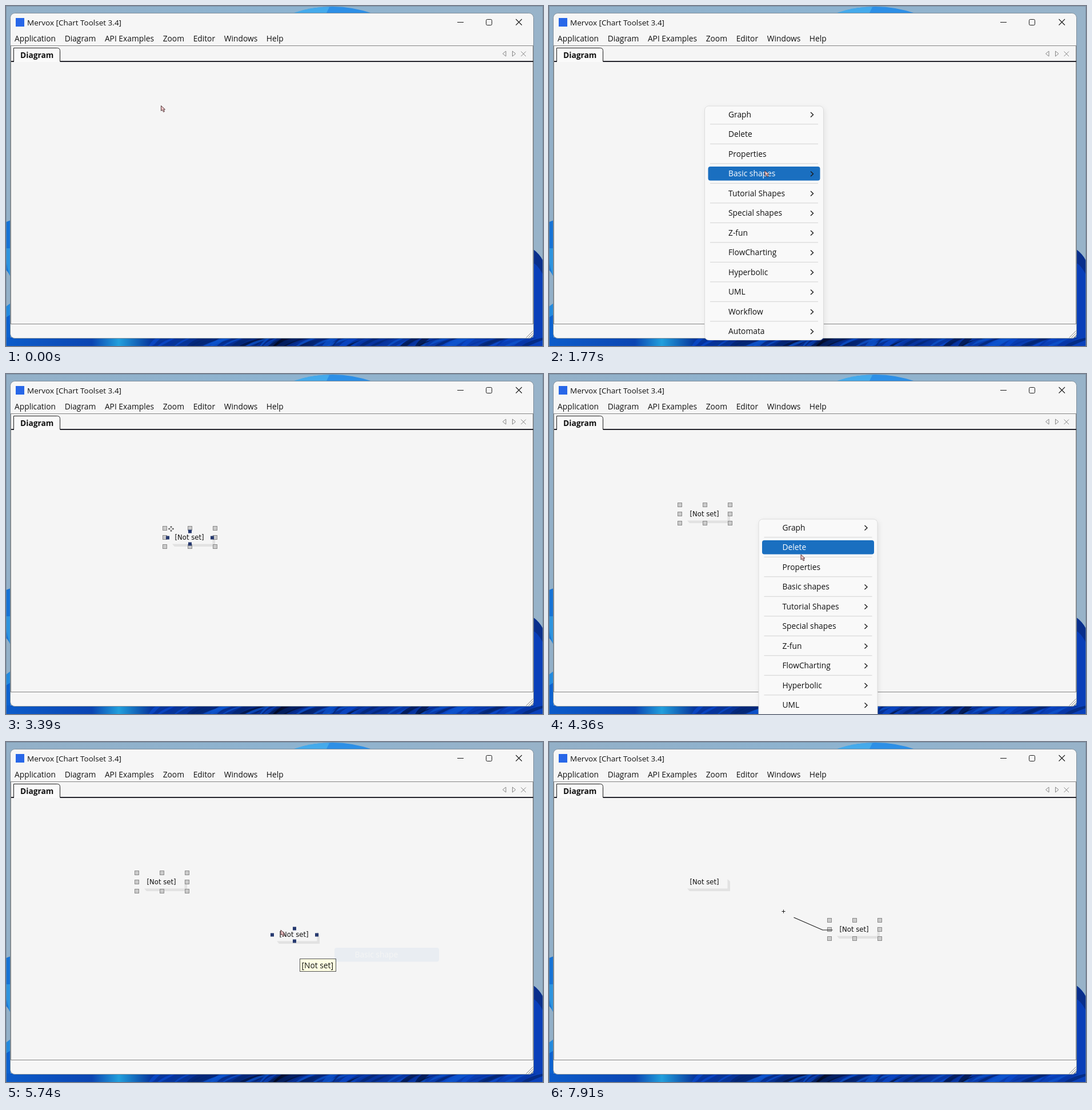
An HTML page for the animation above (8000 ms loop, 940 by 595 pixels).

```html
<!DOCTYPE html>
<html lang="en">
<head>
<meta charset="utf-8">
<title>Diagram editor</title>
<style>
  html, body { margin: 0; width: 100%; height: 100%; overflow: hidden; }
  svg { display: block; width: 100%; height: 100%; }
  text { font: 13.8px "Open Sans", "Noto Sans", sans-serif; fill: #111; white-space: pre; }
  .title { font-size: 13.5px; }
  .tab { font-weight: 700; }
  .node { font: 11.7px "DejaVu Sans", sans-serif; }
  .on { fill: #fff; }
  .line { fill: none; stroke: #1c1c1c; }
  .grey { fill: none; stroke: #858585; }
  .menu { filter: drop-shadow(2px 3px 4px rgba(0, 0, 0, .07)); }
</style>
</head>
<body>
<svg viewBox="0 0 940 595">
  <defs>
    <linearGradient id="sky"><stop stop-color="#93b0c8"/><stop offset=".5" stop-color="#8db3d0"/><stop offset="1" stop-color="#98b3c9"/></linearGradient>
    <linearGradient id="petals">
      <stop stop-color="#0c5cca"/><stop offset=".16" stop-color="#0b45b2"/><stop offset=".21" stop-color="#229fdc"/>
      <stop offset=".27" stop-color="#07389e"/><stop offset=".46" stop-color="#052a84"/><stop offset=".5" stop-color="#020a24"/>
      <stop offset=".6" stop-color="#063094"/><stop offset="1" stop-color="#0a42bd"/>
    </linearGradient>
  </defs>

  <rect width="940" height="595" fill="url(#sky)"/>
  <path d="M500 14Q570-12 645 14Z" fill="#2d8fe6"/>
  <path d="M500 14Q530 1 566 2L560 14Z" fill="#45aaeb"/>
  <path d="M0 378L8 375V474Q3 464 0 462Z" fill="#1673d6"/>
  <path d="M0 424H8V474Q1 460 0 440Z" fill="#2d94df"/>
  <path d="M0 526L8 520V595H0Z" fill="#238ade"/>
  <path d="M0 545L8 540V595H0Z" fill="#0c62d0"/>
  <path d="M923 426Q934 434 940 446V595H923Z" fill="#0a3fb9"/>
  <path d="M923 426Q934 434 940 446V470Q930 452 923 450Z" fill="#0a2f8c"/>
  <rect y="580" width="940" height="15" fill="url(#petals)"/>
  <g id="folds"></g>
  <path d="M0 .5H940M.5 0V595M939.5 0V595" stroke="#728799" opacity=".7"/>

  <rect x="7.5" y="12.5" width="916" height="569" rx="8" fill="#f6f6f6" stroke="#7f8f9c"/>
  <rect x="9" y="69" width="914" height="487" fill="#f5f5f5"/>
  <path class="grey" d="M8 69.5H923M8.5 69V556M922.5 69V556M8 556.5H923"/>
  <rect x="17" y="21" width="15" height="15" fill="#2867e8"/>
  <text class="title" x="37" y="34">Mervox [Chart Toolset 3.4]</text>
  <path class="line" d="M790 28.5H801M892.5 23L903 33.5M903 23L892.5 33.5" stroke-width="1.1"/>
  <rect class="line" x="840.5" y="23.5" width="10" height="10" rx="2"/>
  <g id="bar"></g>
  <path d="M9 97H923" stroke="#24242c" stroke-width="2"/>
  <path d="M14 98V73.5H89.5Q94.5 73.5 94.5 78.5V98Z" fill="#fafafa"/>
  <path class="line" d="M13.5 97V73.5H89.5Q94.5 73.5 94.5 78.5V97"/>
  <text class="tab" x="25" y="91">Diagram</text>
  <path class="grey" d="M875 79L869.5 83.5L875 88ZM886.5 79L892 83.5L886.5 88ZM901.5 79.5L910 88M910 79.5L901.5 88M910.5 580.5L922.5 568.5M914.5 580.5L922.5 572.5M918.5 580.5L922.5 576.5"/>
  <g id="scene"></g>
</svg>
<script>
const LOOP = 8000, TICK = 130;
const items = ["Graph", "Delete", "Properties", "Basic shapes", "Tutorial Shapes", "Special shapes",
  "Z-fun", "FlowCharting", "Hyperbolic", "UML", "Workflow", "Automata"];
const subItems = ["Basic shape", "Simple shape", "Text label"];
const bar = ["Application", "Diagram", "API Examples", "Zoom", "Editor", "Windows", "Help"];
const ROW = 34.5, PARENT = items.indexOf("Basic shapes");

// Where the pointer turns, stops or clicks: time, x, y
const stops = [
  [0, 271.5, 174.5], [960, 271.5, 174.5], [1230, 362, 205], [1770, 378, 288], [2290, 500, 289],
  [2700, 432, 271], [2950, 465, 321], [3250, 472, 322], [3390, 289, 271], [3670, 240, 230],
  [3940, 365, 253], [4090, 365, 253], [4360, 441, 316], [4750, 458, 370], [5500, 612, 372],
  [5740, 481, 329], [6160, 484, 333], [6530, 514, 324], [6780, 477, 321], [6900, 486, 327],
  [7640, 496.5, 330.5], [7790, 428, 307], [7910, 410.5, 296.5]
];

const during = (t, from, to) => t >= from && t < to;
const clamp = (v, low, high) => Math.min(high, Math.max(low, v));
const label = (x, y, str, cls = "") => `<text x="${x}" y="${y}" class="${cls}">${str}</text>`;
const square = (x, y, size, attrs) =>
  `<rect x="${x - size / 2}" y="${y - size / 2}" width="${size}" height="${size}" ${attrs}/>`;

// Straight legs between stops, advanced in even jumps of about one tick
function pointer(t) {
  const i = stops.findLastIndex(s => s[0] <= t);
  const [t0, x0, y0] = stops[i], [t1, x1, y1] = stops[i + 1] || [LOOP, x0, y0];
  const jumps = Math.round((t1 - t0) / TICK) || 1;
  const u = Math.floor((t - t0) / (t1 - t0) * jumps) / jumps;
  return [x0 + (x1 - x0) * u, y0 + (y1 - y0) * u];
}

function row(x, y, width, str, on) {
  const back = on ? `<rect x="${x}" y="${y}" width="${width}" height="24.5" rx="4" fill="#1a6fc0"/>` : "";
  return back + label(x + 35.5, y + 17, str, on ? "on" : "");
}

function panel(x, y, width, height, content, opacity = 1) {
  return `<g class="menu" opacity="${opacity}"><rect x="${x}" y="${y}" width="${width}" height="${height}"
    rx="7" fill="#f9f9f9" stroke="#dcdcdc"/>${content}</g>`;
}

function mainMenu(x, y, active, opacity) {
  const rows = items.map((str, i) => {
    const top = y + 2.5 + i * ROW;
    const leaf = str == "Delete" || str == "Properties";
    const arrow = leaf ? "" : `<path class="line" stroke-width="1.4" d="M${x + 185.5} ${top + 8.5}l4.5 4.2l-4.5 4.2"/>`;
    const rule = i < items.length - 1 ? `<path d="M${x + 9.5} ${top + 29.3}h189" stroke="#d2d2d2"/>` : "";
    return row(x + 6, top, 196, str, i == active) + arrow + rule;
  });
  return panel(x, y, 208, 409.5, rows.join(""), opacity);
}

function subMenu(x, y, active) {
  const rows = subItems.map((str, i) => row(x + 6, y + 2.5 + i * 26, 183, str, i == active));
  return panel(x, y, 195, 82, rows.join(""));
}

// The menu lights the row under the pointer; the picked entry fades out last.
function menuSession(t, x, y, open, pick) {
  const subX = x + 202, subY = y + 3 * ROW;
  if (during(t, open, pick)) {
    const [px, py] = pointer(t);
    const active = px > x ? Math.floor((py - y - 2.5) / ROW) : -1;
    const opened = active == PARENT && px > x + 150;
    return mainMenu(x, y, active, t < open + TICK ? .6 : 1) +
      (opened ? subMenu(subX, subY, px > subX ? 0 : -1) : "");
  }
  if (during(t, pick, pick + 4 * TICK)) {
    const opacity = Math.max(.05, 1 - Math.floor((t - pick) / 120) / 2);
    return `<g opacity="${opacity}">${row(subX + 6, subY + 2.5, 183, subItems[0], true)}</g>`;
  }
  return "";
}

// New nodes start in one spot and follow the pointer from press to release.
function dragged(t, press, release) {
  const [x0, y0] = pointer(press), [x, y] = pointer(clamp(t, press, release));
  return [505 + x - x0, 337 + y - y0];
}

function node([x, y], selected, hovered) {
  let out = `<path transform="translate(${x} ${y})" d="M-31 11.5H39.5V-5L44 -1V16H-27Z" fill="#e2e2e2"/>` +
    label(x - 26.5, y + 4, "[Not set]", "node");
  if (selected)
    for (const dx of [-44, 0, 44])
      for (const dy of [-16, 0, 16])
        if (dx || dy) out += square(x + dx, y + dy, 7, 'fill="#cbcbcb" stroke="#8a8a8a"');
  if (hovered)
    for (const side of [-1, 1])
      out += square(x + 39 * side, y + .5, 6, 'fill="#26396f"') + square(x, y + .5 + 11 * side, 6, 'fill="#26396f"');
  return out;
}

const tooltip = (x, y) =>
  `<rect x="${x + .5}" y="${y + .5}" width="63" height="22" fill="#ffffe3" stroke="#555"/>` + label(x + 3.5, y + 17, "[Not set]");

function cursor(t, x, y) {
  const shape = t >= 6900
    ? '<path class="line" d="M-3 0H3M0 -3V3"/>'
    : during(t, 3250, 3800) || during(t, 6160, 6650)
      ? '<path class="line" d="M-4 0H-1.5M1.5 0H4M0 -4V-1.5M0 1.5V4M-3 -1.5L-4.5 0L-3 1.5M3 -1.5L4.5 0L3 1.5M-1.5 -3L0 -4.5L1.5 -3M-1.5 3L0 4.5L1.5 3"/>'
      : '<path d="M0 0V9L2.2 7.2L4.2 11L6 10L4.2 6.6H7Z" fill="#efc4c4" stroke="#43282c" stroke-width=".9"/>';
  return `<g transform="translate(${x} ${y})">${shape}</g>`;
}

function draw(t) {
  let out = "";
  if (t >= 2410)
    out += node(dragged(t, 3250, 3670), during(t, 3250, 6160), during(t, 3100, 3820));
  if (t >= 5620)
    out += node(dragged(t, 6160, 6530), t >= 6160, during(t, 5740, 6780) || during(t, 6900, 7360));
  if (t >= 7790)
    out += `<path class="line" stroke-width="1.2" d="M496.5 329H479L${t < 7910 ? "468 322" : "428.5 307"}"/>`;
  if (during(t, 3100, 3250)) out += tooltip(484, 364);
  if (during(t, 5740, 5890)) out += tooltip(514, 379);

  out += menuSession(t, 272.5, 175, 840, 2290) + menuSession(t, 367, 254, 4090, 5500);
  return out + cursor(t, ...pointer(t));
}

// Slanted folds of the wallpaper along the bottom edge
function folds() {
  const blues = ["#04246f", "#0a4bd0", "#0632a0", "#02123c", "#0d55cf"];
  let seed = 11, out = "";
  const random = () => (seed = seed * 16807 % 2147483647) / 2147483647;
  for (let x = 250; x < 910; x += 4 + random() * 14) {
    const lean = 15 + random() * 35, width = 2 + random() * 12;
    out += `<path d="M${x} 595q${lean / 3} -10 ${lean} -15h${width}q${-lean / 2} 6 ${-lean} 15Z" fill="${blues[Math.floor(random() * blues.length)]}" opacity=".7"/>`;
  }
  return out;
}

document.getElementById("folds").innerHTML = folds();
const barGroup = document.getElementById("bar");
let barX = 15;
for (const str of bar) {
  barGroup.insertAdjacentHTML("beforeend", label(barX, 62, str));
  barX += barGroup.lastElementChild.getComputedTextLength() + 15.6;
}

const scene = document.getElementById("scene");
let shown;
function tick() {
  const next = draw(performance.now() % LOOP);
  if (next !== shown) scene.innerHTML = shown = next;
  requestAnimationFrame(tick);
}
tick();
</script>
</body>
</html>
```
